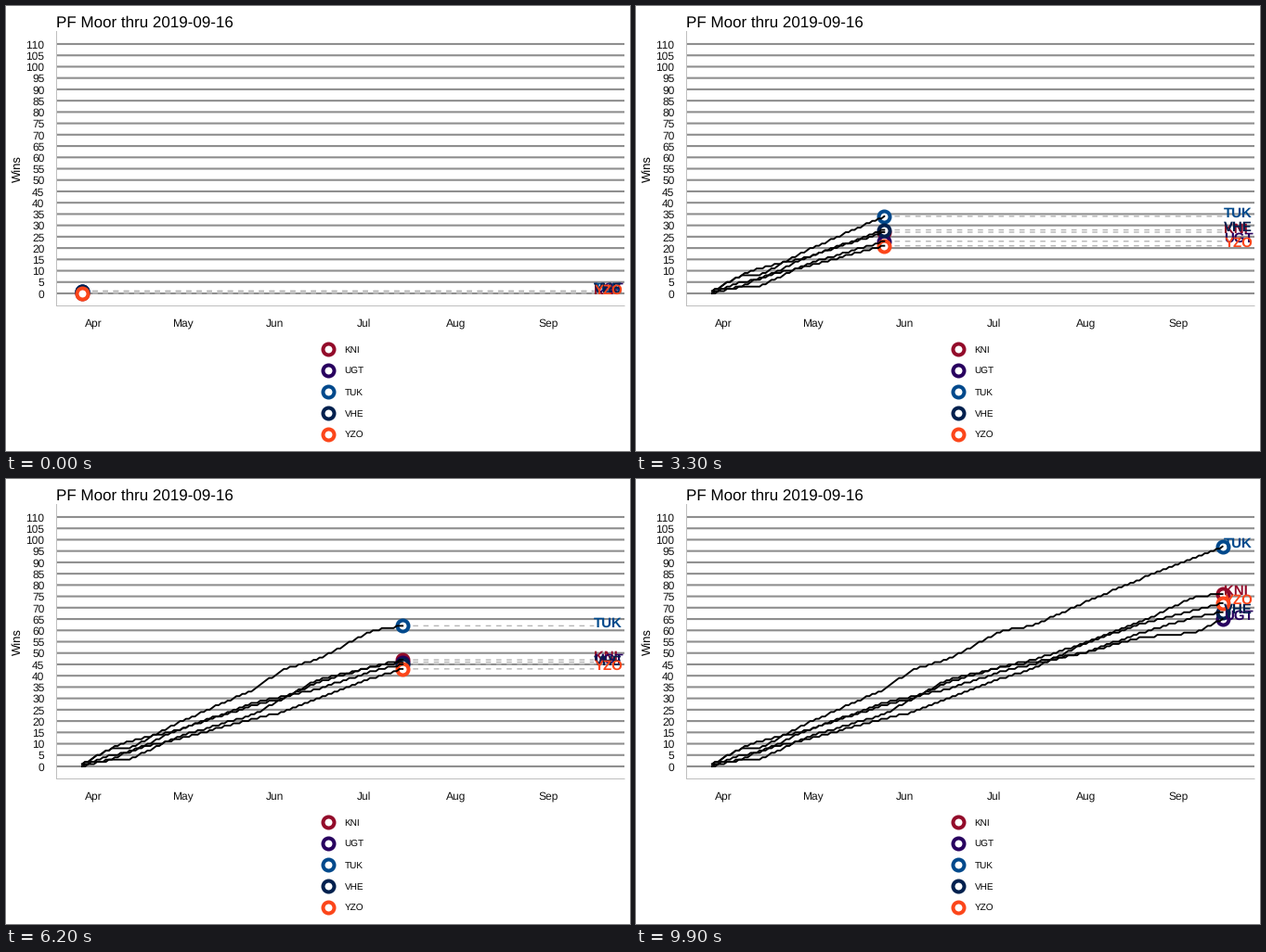
These frames come from a looping animation (672x480 px, 10 s). A matplotlib script:

```python
import matplotlib.pyplot as plt
import numpy as np
from matplotlib.animation import FuncAnimation

W, H, DPI = 672, 480, 100
FRAMES, LAST_DAY = 100, 172
LEFT, RIGHT, TOP, BOTTOM = 54.5, 666, 27.5, 323.5
LABEL_X = 633.3

# Wins at a few turning points of the season; days between are interpolated
KEY_DAYS = (0, 10, 16, 32, 58, 68, 79, 98, 108, 125, 145, 163, 172)
TEAMS = [
    ("KNI", "#930b2a", (0, 5, 6, 16, 27, 30, 38, 44, 47, 54, 64, 75, 76)),
    ("UGT", "#28005f", (1, 3, 3, 13, 23, 30, 37, 44, 46, 50, 57, 59, 65)),
    ("TUK", "#00498c", (1, 8, 8, 19, 34, 43, 47, 60, 62, 72, 83, 92, 97)),
    ("VHE", "#00204e", (1, 8, 11, 16, 28, 31, 34, 42, 45, 50, 59, 66, 68)),
    ("YZO", "#fc461a", (0, 3, 7, 12, 21, 24, 30, 39, 43, 54, 63, 69, 72)),
]

plt.rcParams["font.family"] = ["Liberation Sans", "DejaVu Sans"]
plt.rcParams["text.hinting"] = "no_hinting"
plt.rcParams["text.hinting_factor"] = 1


def pt(px):
    return px * 72 / DPI


def day_x(day):
    return 82 + 3.1955 * day


def win_y(wins):
    return 310 - 2.4455 * wins


fig = plt.figure(figsize=(W / DPI, H / DPI), dpi=DPI, facecolor="white")
ax = fig.add_axes([0, 0, 1, 1])
ax.set_xlim(0, W)
ax.set_ylim(H, 0)
ax.axis("off")


def line(xs, ys, color, width, z, **kw):
    return ax.plot(xs, ys, color=color, lw=pt(width), zorder=z, snap=False,
                   **kw)[0]


def text(x, y, s, size, ha="left", va="baseline", color="#111111", **kw):
    return ax.text(x, y, s, fontsize=pt(size), ha=ha, va=va, color=color, **kw)


def ring(x, y, color, z):
    return ax.plot([x], [y], "o", ms=pt(12), mew=pt(4), mfc="white",
                   mec=color, zorder=z, snap=False)[0]


# Static chart
for wins in range(0, 111, 5):
    y = win_y(wins)
    line([LEFT, RIGHT], [y, y], "#8f8f8f", 2.1, 1, solid_capstyle="butt")
    text(41.5, y + 4.6, str(wins), 11.73, ha="right")
line([LEFT, LEFT], [TOP, BOTTOM], "#bebebe", 1, 1)
line([LEFT, RIGHT], [BOTTOM, BOTTOM], "#bebebe", 1, 1)
for month, day in zip(["Apr", "May", "Jun", "Jul", "Aug", "Sep"],
                      [4, 34, 65, 95, 126, 157]):
    text(day_x(day), 346, month, 11.9, ha="center")
text(54, 23, "PF Moor thru 2019-09-16", 17.3, color="black")
text(12, 176, "Wins", 13.2, ha="center", va="center", color="black",
     rotation=90)
for k, (name, color, _) in enumerate(TEAMS):
    y = 370.3 + 23 * k
    ring(347.3, y, color, 2)
    text(364.6, y + 3.7, name, 9.8, color="black")

# Moving parts, layered by kind and then by team
days = np.arange(LAST_DAY + 1)
trail_x = day_x(days)
moving = []
for k, (name, color, totals) in enumerate(TEAMS):
    z = 0.1 * k
    wins = np.floor(np.interp(days, KEY_DAYS, totals) + 0.5)
    moving.append((
        win_y(wins),
        line([], [], "#b5b5b5", 1.4, 3 + z, ls=(0, (4, 4))),
        ring(0, 0, color, 4 + z),
        line([], [], "black", 1.9, 5 + z),
        text(LABEL_X, 0, name, 14.6, color=color, weight="bold",
             zorder=6 + z),
    ))


def update(i):
    # Latest whole day whose nearest frame is this one
    day = min(int((i + 0.5) * LAST_DAY / (FRAMES - 1)), LAST_DAY)
    x = trail_x[day]
    for ys, guide, dot, trail, label in moving:
        y = ys[day]
        guide.set_data([x, LABEL_X], [y, y])
        dot.set_data([x], [y])
        trail.set_data(trail_x[:day + 1], ys[:day + 1])
        label.set_y(y + 1)
    return []


anim = FuncAnimation(fig, update, frames=FRAMES, interval=100, repeat=True,
                     repeat_delay=0, blit=False)
plt.show()
```
